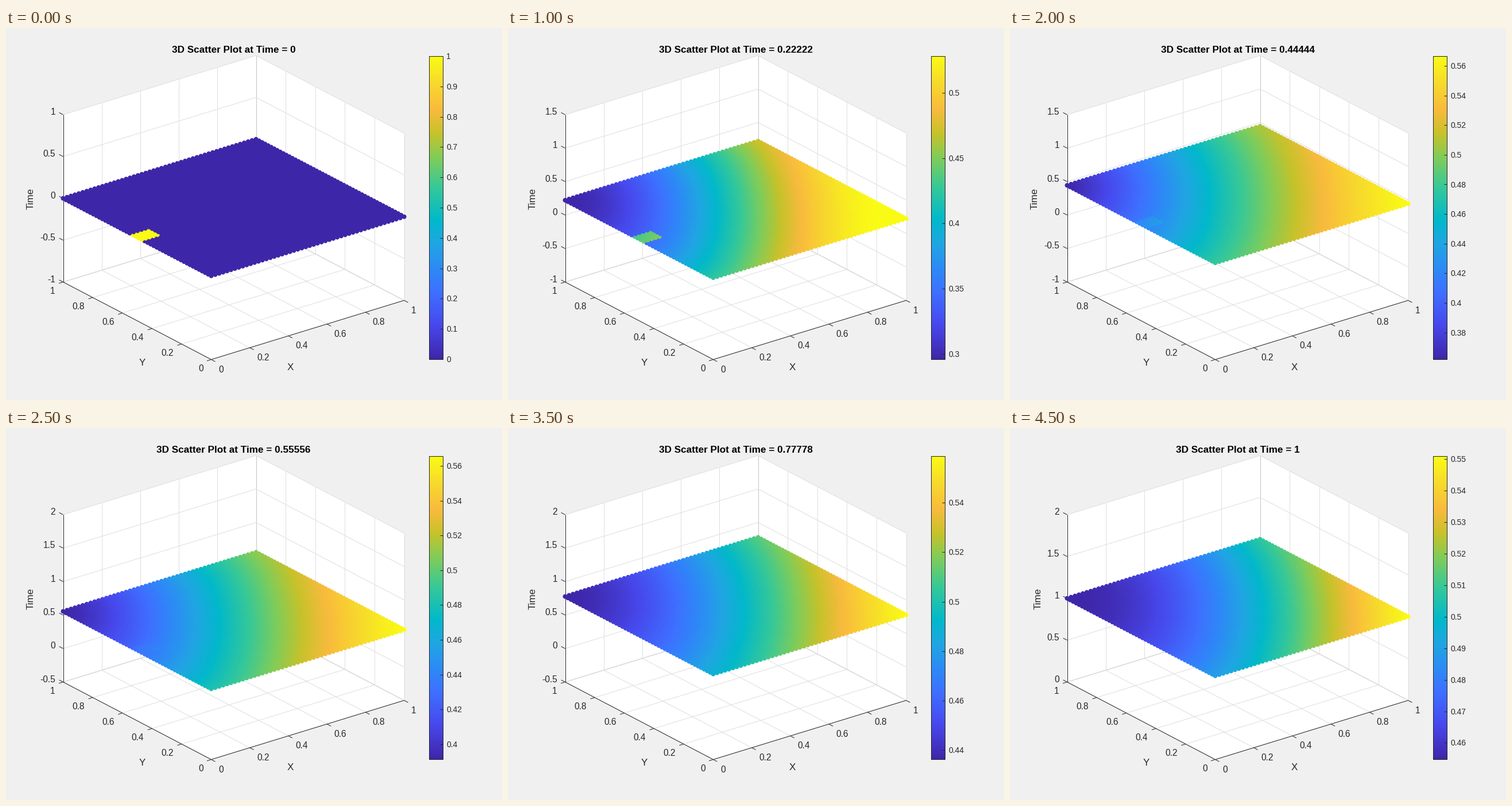
Write a matplotlib script that moves like this. It is 864 by 648 pixels and loops after 5 s.

```python
import numpy as np
import matplotlib.pyplot as plt
from matplotlib.animation import FuncAnimation
from matplotlib.colors import LinearSegmentedColormap

W, H, DPI = 864, 648, 100
PX = 72 / DPI
STEPS = 10
DARK, GRID, BACK = "#262626", "#dedede", "#c4c4c4"
plt.rcParams["font.family"] = "Liberation Sans"

# Axes box on screen: origin corner and the three axis vectors
ORIGIN = np.array([357.5, 577.5])
EX = np.array([336.0, -103.0])
EY = np.array([-258.0, -135.0])
EZ = np.array([0.0, -291.5])
SPLITS = np.linspace(0, 1, 6)

CMAP = LinearSegmentedColormap.from_list("blue_yellow", [
    (0, "#3e26a8"), (.11, "#4747eb"), (.22, "#3e6fff"), (.29, "#2e87f7"),
    (.38, "#20a5e2"), (.46, "#01b8ca"), (.57, "#37c897"), (.665, "#80cc59"),
    (.745, "#c5c22a"), (.825, "#f8ba3d"), (.92, "#f7dc2a"), (1, "#f9fb15")])

gx, gy = (a.ravel() for a in np.meshgrid(
    np.linspace(0, 1, 50), np.linspace(0, 1, 50), indexing="ij"))
in_patch = (gx < .1) & (abs(gy - .5) < .05)
# Distance from the left corner of the sheet, 0 to 1
dist = (gx ** 1.25 + .74 * (1 - gy) ** 1.25) / 1.74


def field(t):
    """Heat on the sheet: a smooth slope plus a fading hot patch."""
    low = (.2302 * (1 - np.exp(-127 * t * t))
           + .2849 * t + .0958 * t ** 2 - .1561 * t ** 3)
    high = .587 * (1 - np.exp(-11 * t)) - .036 * t
    early = np.exp(-(t / .3) ** 4)
    bulge = .55 + .8 * early
    power = .35 + 1.25 * t + early
    base = dist + bulge * (np.sin(np.pi / 2 * dist) - dist)
    shape = np.clip(base, 0, 1) ** power
    return low + (high - low) * shape + in_patch * np.exp(-10.45 * t)


def z_range(t):
    lo = np.floor(2 * (t - 1) + 1e-9) / 2
    hi = np.ceil(2 * (t + 1) - 1e-9) / 2
    return lo, hi


def tick_step(span):
    """Smallest 1-2-5 step that keeps the bar uncrowded."""
    steps = (m * 10.0 ** e for e in (-2, -1) for m in (1, 2, 5))
    return next(s for s in steps if span / s < 11.55)


def point(x, y, z=0):
    return ORIGIN + x * EX + y * EY + z * EZ


fig = plt.figure(figsize=(W / DPI, H / DPI), dpi=DPI, facecolor="#f0f0f0")
ax = fig.add_axes([0, 0, 1, 1])


def line(a, b, color=DARK, z=2):
    ax.plot([a[0], b[0]], [a[1], b[1]], color=color, lw=PX, zorder=z,
            solid_capstyle="butt")


def label(x, y, s, size, ha="center", color=DARK, **kw):
    ax.text(x, y + .36 * size, s, fontsize=size * PX, ha=ha, va="baseline",
            color=color, zorder=5, **kw)


def tick(p, direction):
    line(p, p + 7.8 * direction / np.hypot(*direction))


def draw_box(z_lo, z_hi):
    hull = [point(*c) for c in ((0, 0, 0), (1, 0, 0), (1, 0, 1),
                                (1, 1, 1), (0, 1, 1), (0, 1, 0))]
    ax.fill(*zip(*hull), color="white", lw=0, zorder=0)
    for v in SPLITS:
        line(point(v, 0), point(v, 1), GRID, 1)
        line(point(0, v), point(1, v), GRID, 1)
        line(point(v, 1), point(v, 1, 1), GRID, 1)
        line(point(1, v), point(1, v, 1), GRID, 1)
    for end in ((0, 1), (1, 0), (1, 1, 1)):
        line(point(1, 1), point(*end), BACK, 1)

    for v in SPLITS:
        px, py = point(v, 0), point(0, v)
        tick(px, -EY)
        tick(py, -EX)
        label(px[0] + 12.5, px[1] + 16.5, f"{v:g}", 15.5, "left")
        label(py[0] - 14, py[1] + 14.5, f"{v:g}", 15.5, "right")
    for v in np.arange(z_lo, z_hi + .1, .5):
        f = (v - z_lo) / (z_hi - z_lo)
        line(point(0, 1, f), point(1, 1, f), GRID, 1)
        line(point(1, 1, f), point(1, 0, f), GRID, 1)
        p = point(0, 1, f)
        tick(p, EY)
        label(86, p[1] - 5.5, f"{v:g}", 15.5, "right")

    for end in ((1, 0), (0, 1)):
        line(point(0, 0), point(*end))
    line(point(0, 1), point(0, 1, 1))


def draw_bar(lo, hi):
    left, right, top, bottom = 736.5, 760.5, 49, 577
    ax.pcolormesh([left, right], np.linspace(bottom, top, 257),
                  np.linspace(0, 1, 256)[:, None], cmap=CMAP, zorder=1)
    ax.plot([left, right, right, left, left], [top, top, bottom, bottom, top],
            color=DARK, lw=PX, zorder=2)
    step = tick_step(hi - lo)
    first = int(np.ceil(lo / step - 1e-9))
    last = int(np.floor(hi / step + 1e-9))
    for v in step * np.arange(first, last + 1):
        y = bottom - (v - lo) / (hi - lo) * (bottom - top)
        line((right - 5, y), (right, y))
        label(767, y, f"{v:.4g}", 13.9, "left")


def draw(i):
    ax.clear()
    t = i / (STEPS - 1)
    z_lo, z_hi = z_range(t)
    draw_box(z_lo, z_hi)

    u = field(t)
    pos = point(gx[:, None], gy[:, None], (t - z_lo) / (z_hi - z_lo))
    ax.scatter(*pos.T, s=(8 * PX) ** 2, c=u, cmap=CMAP, linewidths=0, zorder=3)
    draw_bar(u.min(), u.max())

    label(396.5, 36.5, f"3D Scatter Plot at Time = {t:.5g}", 17.15,
          color="black", weight="bold")
    label(495, 590, "X", 17)
    label(237.5, 582, "Y", 17)
    # The axis name sits closer when no tick label has a minus sign
    ax.text(43 if z_lo < 0 else 49, 297, "Time", fontsize=17 * PX, color=DARK,
            rotation=90, ha="center", va="center", zorder=5)
    ax.set_xlim(0, W)
    ax.set_ylim(H, 0)
    ax.axis("off")
    return []


anim = FuncAnimation(fig, draw, frames=STEPS, init_func=lambda: [],
                     interval=500, repeat=True, repeat_delay=0, blit=False)
plt.show()
```
